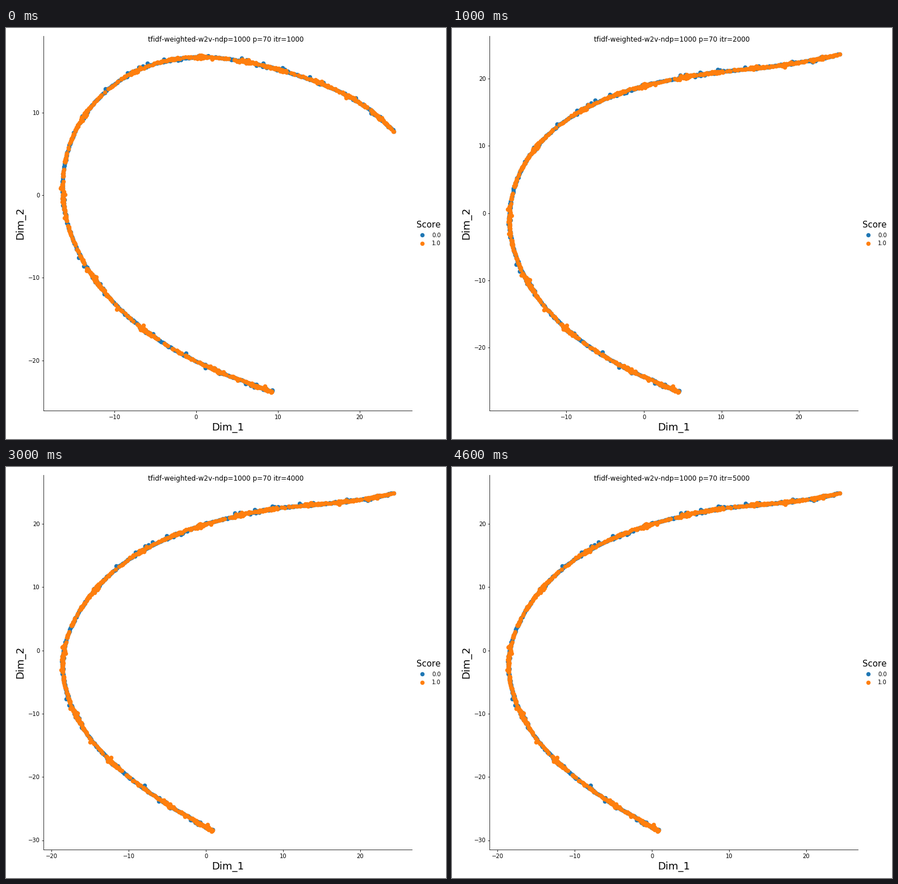
Write a matplotlib script that moves like this. It is 775x723 px and loops after 5 s.

```python
import numpy as np
import matplotlib.pyplot as plt
from matplotlib.animation import FuncAnimation
from matplotlib.ticker import MultipleLocator

W, H, DPI = 775, 723, 72
LEFT, RIGHT, TOP, BOTTOM = 66.4, 715.2, 14, 673.2
BLUE, ORANGE = "#1f77b4", "#ff7f0e"

plt.rcParams["font.family"] = "DejaVu Sans"
plt.rcParams["text.kerning_factor"] = 6

# Key points of the curve in stage pixels, axis origin (px), px per unit
EARLY = ([(468, 640), (290, 562), (161, 449), (101, 305), (120, 185),
          (228, 76), (345, 51), (483, 74), (652, 153), (683, 182)],
         (335, 294), (14.4, 14.53))
MIDDLE = ([(399, 640), (241, 560), (136, 452), (101, 340), (129, 236),
           (233, 142), (341, 101), (466, 78), (643, 55), (683, 46)],
          (338, 325.6), (13.65, 11.83))
SETTLED = ([(363, 640), (221, 549), (125, 441), (100, 338), (139, 238),
            (240, 147), (344, 103), (467, 74), (645, 54), (683, 46)],
           (352, 322.6), (13.6, 11.13))
STAGES = [EARLY, MIDDLE, SETTLED]

# Where points crowd together, as a share of the curve's length
CROWDS = [0.01, 0.03, 0.08, 0.19, 0.277, 0.29, 0.41, 0.53,
          0.62, 0.675, 0.713, 0.777, 0.822, 0.88, 0.924, 0.967]


def chord(p):
    return np.r_[0, np.cumsum(np.hypot(*np.diff(p, axis=0).T))]


def spline(s, p, at):
    """Natural cubic spline through p(s): values and slopes."""
    n, h = len(s), np.diff(s)
    a, b = np.eye(n), np.zeros((n, 2))
    for i in range(1, n - 1):
        a[i, i - 1:i + 2] = h[i - 1], 2 * (h[i - 1] + h[i]), h[i]
        b[i] = 6 * ((p[i + 1] - p[i]) / h[i] - (p[i] - p[i - 1]) / h[i - 1])
    m = np.linalg.solve(a, b)
    k = np.clip(np.searchsorted(s, at) - 1, 0, n - 2)
    t, hk = (at - s[k])[:, None], h[k][:, None]
    c = (p[k + 1] - p[k]) / hk - hk * (2 * m[k] + m[k + 1]) / 6
    d = (m[k + 1] - m[k]) / (6 * hk)
    return p[k] + t * (c + t * (m[k] / 2 + t * d)), c + t * (m[k] + 3 * t * d)


def place(points, u, off):
    """Points at share u of the curve, moved outward by off pixels."""
    p = np.array(points, float)
    s, ref = chord(p), chord(EARLY[0])
    pos, slope = spline(s, p, np.interp(u, ref / ref[-1], s))
    slope /= np.hypot(*slope.T)[:, None]
    return pos + np.c_[slope[:, 1], -slope[:, 0]] * off[:, None]


def sample(u, crowd, strays):
    """Thin band along u, wider crowds, and a few strays, mostly outward."""
    mid = np.repeat(CROWDS, crowd)
    side = np.where(rng.random(strays) < 0.85, 1, -1)
    u = np.r_[u, rng.normal(mid, 0.007), rng.random(strays)]
    off = np.r_[rng.normal(0, 0.5, len(u) - len(mid) - strays),
                rng.normal(0, 1.5, len(mid)),
                side * rng.uniform(2.5, 5, strays)]
    return np.clip(u, 0, 1), off


rng = np.random.default_rng(7)
blue = sample(np.linspace(0, 1, 500), 12, 18)
orange = sample(np.r_[0, rng.random(520), 1], 20, 4)

fig = plt.figure(figsize=(W / DPI, H / DPI), dpi=DPI, facecolor="white")
ax = fig.add_axes([LEFT / W, 1 - BOTTOM / H, (RIGHT - LEFT) / W, (BOTTOM - TOP) / H])
ax.spines[["top", "right"]].set_visible(False)
ax.set_xlabel("Dim_1", fontsize=18)
ax.set_ylabel("Dim_2", fontsize=18)
for axis in (ax.xaxis, ax.yaxis):
    axis.set_major_locator(MultipleLocator(10))
title = fig.suptitle("", fontsize=12, y=0.98)

# Overlay in stage pixels
stage = fig.add_axes([0, 0, 1, 1])
stage.axis("off")


def dots(x, y, color):
    return stage.scatter(x, y, s=36, color=color, linewidths=1.5)


layers = [(dots([], [], BLUE), blue), (dots([], [], ORANGE), orange)]
stage.text(722.5, 351, "Score", fontsize=15)
for y, color, label in ((364, BLUE, "0.0"), (379, ORANGE, "1.0")):
    dots([732.5], [y], color)
    stage.text(750, y + 3.5, label, fontsize=10)
stage.set(xlim=(0, W), ylim=(H, 0))


def draw(i):
    points, (x0, y0), (sx, sy) = STAGES[min(i, 2)]
    ax.set_xlim((LEFT - x0) / sx, (RIGHT - x0) / sx)
    ax.set_ylim((y0 - BOTTOM) / sy, (y0 - TOP) / sy)
    for layer, (u, off) in layers:
        layer.set_offsets(place(points, u, off))
    title.set_text(f"tfidf-weighted-w2v-ndp=1000 p=70 itr={1000 * (i + 1)}")
    return [title] + [layer for layer, _ in layers]


anim = FuncAnimation(fig, draw, frames=5, interval=1000, repeat=True, blit=False)
plt.show()
```
